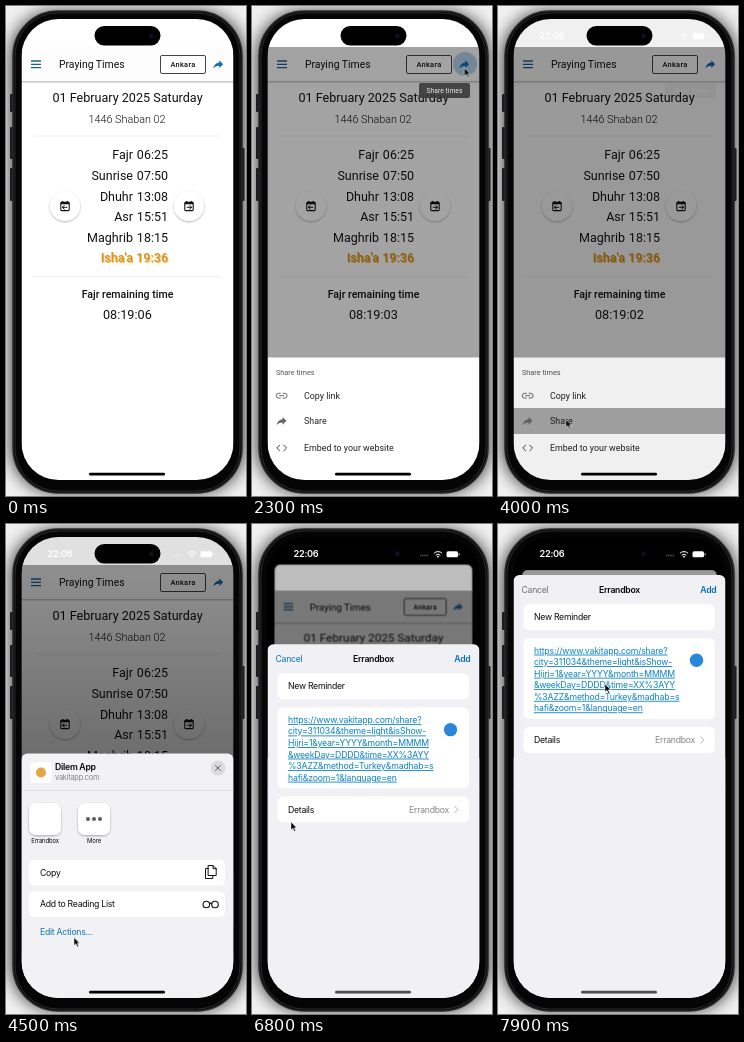
An HTML page that plays this animation: 240 px wide and 490 px high, repeating every 8 s.

```html
<!DOCTYPE html>
<html lang="en">
<head>
<meta charset="utf-8">
<title>Praying Times</title>
<style>
html, body { margin: 0; width: 100%; height: 100%; overflow: hidden; background: #eee; }
svg { display: block; width: 100vw; height: 100vh; }

.web text { font-family: Roboto, sans-serif; fill: #111; }
.ios text { font-family: Inter, sans-serif; font-size: 8.7px; letter-spacing: -.031em; fill: #0a0a0a; }
.web .times { font-size: 12.5px; }
.web .now { fill: #cf9432; font-weight: 500; text-shadow: .9px .8px 0 #ffbd45; }
.web .clock { font-size: 12.7px; }
.web .menu { font-size: 8.9px; fill: #222; }
.ios .bold { font-weight: 600; }
.ios .grey { fill: #85858a; }
.ios .blue { fill: #0a72b8; }
.ios .small { font-size: 6px; }
.ios .link { fill: #0b82c4; letter-spacing: -.018em; text-decoration: underline; }
.mid { text-anchor: middle; }
.end { text-anchor: end; }
.line { fill: none; stroke-width: 1; stroke-linecap: round; stroke-linejoin: round; }

.anim { animation: 8s linear infinite; }
#digits { animation-name: digits; animation-timing-function: step-end; }
#ripple { animation-name: ripple; }
#tip { animation-name: tip; }
#webDim { animation-name: webDim; }
#webSheet { animation-name: webSheet; }
#tapped { animation-name: tapped; }
#dim { animation-name: dim; }
#shade { animation-name: shade; }
#share { animation-name: share; }
#card { animation-name: card; transform-origin: 121.5px 13px; }
#note { animation-name: note; }
#cancel { animation-name: cancel; animation-timing-function: step-end; }
#home { animation-name: home; }
#cursor { animation-name: cursor; }

@keyframes digits {
  0% { transform: translateY(0); }
  2.5% { transform: translateY(-20px); }
  15% { transform: translateY(-40px); }
  27.5% { transform: translateY(-60px); }
  40% { transform: translateY(-80px); }
  52.5%, 100% { transform: translateY(-100px); }
}
@keyframes ripple {
  0%, 22% { opacity: 0; }
  24.5%, 29.5% { opacity: 1; }
  33%, 100% { opacity: 0; }
}
@keyframes tip {
  0%, 22.5% { opacity: 0; }
  25%, 35.5% { opacity: .9; }
  38.5%, 53% { opacity: .06; }
  55%, 100% { opacity: 0; }
}
@keyframes webDim {
  0%, 24.5% { opacity: 0; }
  28%, 100% { opacity: .36; }
}
@keyframes webSheet {
  0%, 24.5% { transform: translateY(123px); animation-timing-function: ease-out; }
  28.2%, 100% { transform: none; }
}
@keyframes tapped {
  0%, 46.3% { opacity: 0; }
  48%, 100% { opacity: .34; }
}
@keyframes dim {
  0%, 48.75% { opacity: 0; }
  51.25%, 80.6% { opacity: .12; animation-timing-function: ease-in; }
  87.3%, 100% { opacity: .4; }
}
@keyframes shade {
  0%, 50% { opacity: 0; }
  55.8%, 80.6% { opacity: 1; }
  84%, 100% { opacity: 0; }
}
@keyframes share {
  0%, 50% { transform: translateY(246px); animation-timing-function: ease-out; }
  55.8%, 100% { transform: none; }
}
@keyframes card {
  0%, 80.625% { transform: none; animation-timing-function: ease-out; }
  87.3%, 100% { transform: translateY(33px) scale(.917); }
}
@keyframes note {
  0%, 80.625% { transform: translateY(423px); animation-timing-function: ease-out; }
  87.3%, 100% { transform: none; }
}
@keyframes cancel {
  0% { fill: #0a72b8; }
  88.5%, 100% { fill: #6e6e74; }
}
@keyframes home {
  0%, 80.6% { opacity: 1; }
  84%, 100% { opacity: .68; }
}
@keyframes cursor {
  0%, 12.5% { transform: translate(250px, 150px); animation-timing-function: ease-out; }
  17.5% { transform: translate(204px, 76px); animation-timing-function: ease-in-out; }
  22%, 34% { transform: translate(212.5px, 62px); animation-timing-function: ease-in-out; }
  42%, 58% { transform: translate(68px, 413.5px); animation-timing-function: ease-in-out; }
  66%, 80% { transform: translate(41px, 313px); animation-timing-function: ease-in-out; }
  85% { transform: translate(39px, 298px); animation-timing-function: ease-in-out; }
  95%, 100% { transform: translate(107px, 160px); }
}
</style>
</head>
<body>
<svg viewBox="0 0 240 490" xmlns="http://www.w3.org/2000/svg">
  <defs>
    <clipPath id="screen"><rect x="15.5" y="13" width="212" height="461" rx="37"/></clipPath>
    <clipPath id="cardClip"><rect x="15.5" y="13" width="212" height="500" rx="6"/></clipPath>
    <clipPath id="digitClip"><rect x="136" y="301" width="14" height="15"/></clipPath>
    <filter id="blur" x="-20%" y="-20%" width="140%" height="140%"><feGaussianBlur stdDeviation="8"/></filter>
    <filter id="lift" x="-30%" y="-30%" width="160%" height="170%">
      <feDropShadow dx="0" dy="1" stdDeviation="1.1" flood-opacity=".32"/>
    </filter>
    <linearGradient id="fade" x2="0" y2="1">
      <stop stop-opacity="0"/>
      <stop offset="1" stop-opacity=".24"/>
    </linearGradient>
    <path id="arrow" d="M14 9V5l7 7-7 7v-4.1c-5 0-8.5 1.6-11 5.1 1-5 4-10 11-11z"/>
    <g id="dayButton">
      <circle r="15" fill="#fff" filter="url(#lift)"/>
      <rect x="-4.2" y="-3.6" width="8.4" height="8.2" rx=".8" fill="none" stroke="#111" stroke-width="1.1"/>
      <path d="M-4.2-2.6h8.4M-2.4-5v2M2.4-5v2" stroke="#111" stroke-width="1.5"/>
      <path d="M-2.6 1.3h4.4M-.7-.6l-2 1.9 2 1.9" class="line" stroke="#111"/>
    </g>
  </defs>

  <!-- phone body -->
  <rect width="240" height="490" fill="#f0f0f0"/>
  <rect x="4" y="5" width="235" height="482" rx="46" opacity=".7" filter="url(#blur)"/>
  <g fill="#1c1c1e">
    <rect x="4" y="88" width="5" height="18" rx="1"/>
    <rect x="4" y="121" width="5" height="32" rx="1"/>
    <rect x="4" y="162" width="5" height="33" rx="1"/>
    <rect x="234" y="142" width="4.5" height="53" rx="1"/>
  </g>
  <rect x="7" y="5" width="229" height="482" rx="45" fill="#050505" stroke="#2a2a2c" stroke-width="1.5"/>
  <rect x="9" y="7" width="225" height="478" rx="43" fill="none" stroke="#3c3c3f" stroke-width=".7"/>

  <g clip-path="url(#screen)">
    <rect x="15" y="13" width="213" height="461"/>

    <g id="card" class="anim">
      <g class="web" clip-path="url(#cardClip)">
        <rect x="15" y="13" width="213" height="461" fill="#fff"/>

        <!-- header -->
        <rect x="10" y="41" width="223" height="34" fill="#fdfdfd" filter="url(#lift)"/>
        <rect x="15" y="13" width="213" height="28" fill="#fff"/>
        <path d="M25 55h10M25 58.3h10M25 61.6h10" stroke="#1d5f9c" stroke-width="1.3"/>
        <text x="53" y="62" font-size="10.4">Praying Times</text>
        <rect x="154.5" y="49.5" width="45" height="18" rx="1.5" fill="#fff" stroke="#444"/>
        <text x="177" y="61.2" class="mid" font-size="7.4" font-weight="500" letter-spacing=".3">Ankara</text>
        <circle id="ripple" class="anim" cx="213" cy="58" r="12" fill="#b4d2ee"/>
        <use href="#arrow" transform="translate(205.6 51.6) scale(.55)" fill="#176bb4"/>

        <!-- times -->
        <text x="121.5" y="96.4" class="mid" font-size="12.6">01 February 2025 Saturday</text>
        <text x="121" y="117" class="mid" font-size="10.8" font-weight="300">1446 Shaban 02</text>
        <path d="M28 130h187M28 270.5h187" stroke="#f0f0f0"/>
        <g class="times end">
          <text x="127" y="153.4">Fajr</text><text x="162" y="153.4">06:25</text>
          <text x="127" y="174">Sunrise</text><text x="162" y="174">07:50</text>
          <text x="127" y="194.6">Dhuhr</text><text x="162" y="194.6">13:08</text>
          <text x="127" y="215.2">Asr</text><text x="162" y="215.2">15:51</text>
          <text x="127" y="235.8">Maghrib</text><text x="162" y="235.8">18:15</text>
          <text x="127" y="256.4" class="now">Isha'a</text><text x="162" y="256.4" class="now">19:36</text>
        </g>
        <use href="#dayButton" x="59" y="200"/>
        <use href="#dayButton" transform="translate(183 200) scale(-1 1)"/>

        <!-- countdown -->
        <text x="121.5" y="291.5" class="mid" font-size="10.6" font-weight="500">Fajr remaining time</text>
        <text x="138.7" y="313.4" class="clock end">08:19:0</text>
        <g clip-path="url(#digitClip)">
          <g id="digits" class="anim clock">
            <text x="138.7" y="313.4">6</text>
            <text x="138.7" y="333.4">5</text>
            <text x="138.7" y="353.4">4</text>
            <text x="138.7" y="373.4">3</text>
            <text x="138.7" y="393.4">2</text>
            <text x="138.7" y="413.4">1</text>
          </g>
        </g>

        <rect id="webDim" class="anim" x="15" y="41" width="213" height="433"/>
        <g id="tip" class="anim">
          <rect x="167" y="77" width="51" height="15" rx="2" fill="#3a3a3a"/>
          <text x="192.5" y="86.7" class="mid" font-size="6.8" style="fill:#f0f0f0">Share times</text>
        </g>

        <!-- bottom sheet -->
        <g id="webSheet" class="anim">
          <rect x="15" y="351.5" width="213" height="123" fill="#fff"/>
          <rect id="tapped" class="anim" x="15" y="402" width="213" height="26"/>
          <text x="24" y="369" font-size="7.3" style="fill:#555">Share times</text>
          <text x="52" y="392.7" class="menu">Copy link</text>
          <text x="52" y="417.8" class="menu">Share</text>
          <text x="52" y="445" class="menu">Embed to your website</text>
          <path d="M28.3 387.3h-1.6a2.4 2.4 0 0 0 0 4.8h1.6M31.1 387.3h1.6a2.4 2.4 0 0 1 0 4.8h-1.6M27.6 389.7h4.2" class="line" stroke="#666"/>
          <use href="#arrow" transform="translate(22.9 408.2) scale(.55)" fill="#666"/>
          <path d="M27.6 439.2l-2.8 2.8 2.8 2.8M31.8 439.2l2.8 2.8-2.8 2.8" class="line" stroke="#444"/>
        </g>
      </g>
      <rect id="dim" class="anim" x="15" y="13" width="213" height="461" clip-path="url(#cardClip)"/>
    </g>

    <!-- status bar -->
    <g class="ios">
      <text x="54" y="33.3" class="mid" font-weight="600" style="fill:#fff;font-size:9.2px">22:06</text>
      <path d="M168 31.5h8" stroke="#fff" stroke-width="1.3" stroke-dasharray="1.3 .9" opacity=".35"/>
      <path d="M182.2 29a5.4 5.4 0 0 1 7.6 0M183.9 31a3 3 0 0 1 4.2 0" class="line" stroke="#fff" stroke-width="1.3"/>
      <circle cx="186" cy="32.7" r=".9" fill="#fff"/>
      <rect x="194.5" y="27.3" width="11.5" height="6" rx="1.6" fill="#fff"/>
      <rect x="206.6" y="29.2" width=".9" height="2.2" rx=".4" fill="#fff"/>
    </g>

    <!-- share sheet with its soft shade above -->
    <rect id="shade" class="anim" x="15" y="50" width="213" height="185" fill="url(#fade)"/>
    <g id="share" class="anim ios">
      <rect x="15.5" y="229.5" width="212" height="270" rx="6" fill="#f2f2f4"/>
      <rect x="24.5" y="238" width="21" height="21" rx="4" fill="#fff"/>
      <circle cx="35" cy="248.5" r="5" fill="#e5a544"/>
      <text x="49" y="246.3" class="bold">Dilem App</text>
      <text x="49" y="256" class="grey" style="font-size:7.4px">vakitapp.com</text>
      <circle cx="212" cy="244" r="7.5" fill="#dcdce0"/>
      <path d="M209.4 241.4l5.2 5.2M214.6 241.4l-5.2 5.2" class="line" stroke="#65656a" stroke-width="1.2"/>
      <path d="M15 266.5h213" stroke="#dadadd" stroke-width=".7"/>
      <g fill="#fff" filter="url(#lift)">
        <rect x="23" y="279" width="32" height="32" rx="7"/>
        <rect x="72" y="279" width="32" height="32" rx="7"/>
      </g>
      <path d="M82 295h0M88 295h0M94 295h0" class="line" stroke="#5c5c60" style="stroke-width:4"/>
      <text x="39" y="318.5" class="small mid">Errandbox</text>
      <text x="88" y="318.5" class="small mid">More</text>
      <g fill="#fff">
        <rect x="23" y="336" width="196" height="25.5" rx="5.5"/>
        <rect x="23" y="367.5" width="196" height="25.5" rx="5.5"/>
      </g>
      <text x="34" y="352">Copy</text>
      <text x="34" y="383.4">Add to Reading List</text>
      <text x="34" y="410.5" class="blue">Edit Actions...</text>
      <path d="M202.5 341.5h4.5l3.2 3.2v6.8h-7.7zM207 341.5v3.2h3.2M202.5 344.5h-3v10h7.3v-3" class="line" stroke="#111"/>
      <g fill="none" stroke="#111" stroke-width="1.1">
        <circle cx="200.3" cy="380.5" r="3.3"/><circle cx="209" cy="380.5" r="3.3"/>
        <path d="M203.5 380a1.2 1.2 0 0 1 2.3 0"/>
      </g>
    </g>

    <!-- new note sheet -->
    <g id="note" class="anim ios">
      <rect x="15.5" y="51" width="212" height="450" rx="6" fill="#f0f0f5"/>
      <text id="cancel" class="anim" x="23.5" y="69">Cancel</text>
      <text x="121.5" y="69" class="bold mid">Errandbox</text>
      <text x="218.5" y="69" class="bold blue end">Add</text>
      <g fill="#fff">
        <rect x="25.5" y="80" width="191.5" height="26" rx="5.5"/>
        <rect x="25.5" y="114" width="191.5" height="81" rx="5.5"/>
        <rect x="25.5" y="203" width="191.5" height="26" rx="5.5"/>
      </g>
      <text x="36" y="96">New Reminder</text>
      <text x="36" y="129.6" class="link">https://www.vakitapp.com/share?</text>
      <text x="36" y="141.1" class="link">city=311034&amp;theme=light&amp;isShow-</text>
      <text x="36" y="152.7" class="link">Hijri=1&amp;year=YYYY&amp;month=MMMM</text>
      <text x="36" y="164.2" class="link">&amp;weekDay=DDDD&amp;time=XX%3AYY</text>
      <text x="36" y="175.8" class="link">%3AZZ&amp;method=Turkey&amp;madhab=s</text>
      <text x="36" y="187.3" class="link">hafi&amp;zoom=1&amp;language=en</text>
      <circle cx="198.5" cy="136.3" r="6.7" fill="#2a86d8"/>
      <text x="36" y="219.2">Details</text>
      <text x="197" y="219.2" class="grey end">Errandbox</text>
      <path d="M202.8 213l3 3.1-3 3.1" class="line" stroke="#b4b4b9"/>
    </g>

    <rect id="home" class="anim" x="83" y="466.8" width="76" height="2.8" rx="1.4"/>
  </g>

  <rect x="88.5" y="20" width="66" height="19.5" rx="9.75"/>
  <circle cx="145.5" cy="29.8" r="2.6" fill="#0a0b16"/>
  <circle cx="145.5" cy="29.8" r="1" fill="#141836"/>

  <path id="cursor" class="anim" d="M0 0v8l1.9-1.7 1.4 3 1.3-.6-1.4-2.9h2.5z" fill="#000" stroke="#fff" stroke-width=".5"/>
</svg>
</body>
</html>
```
